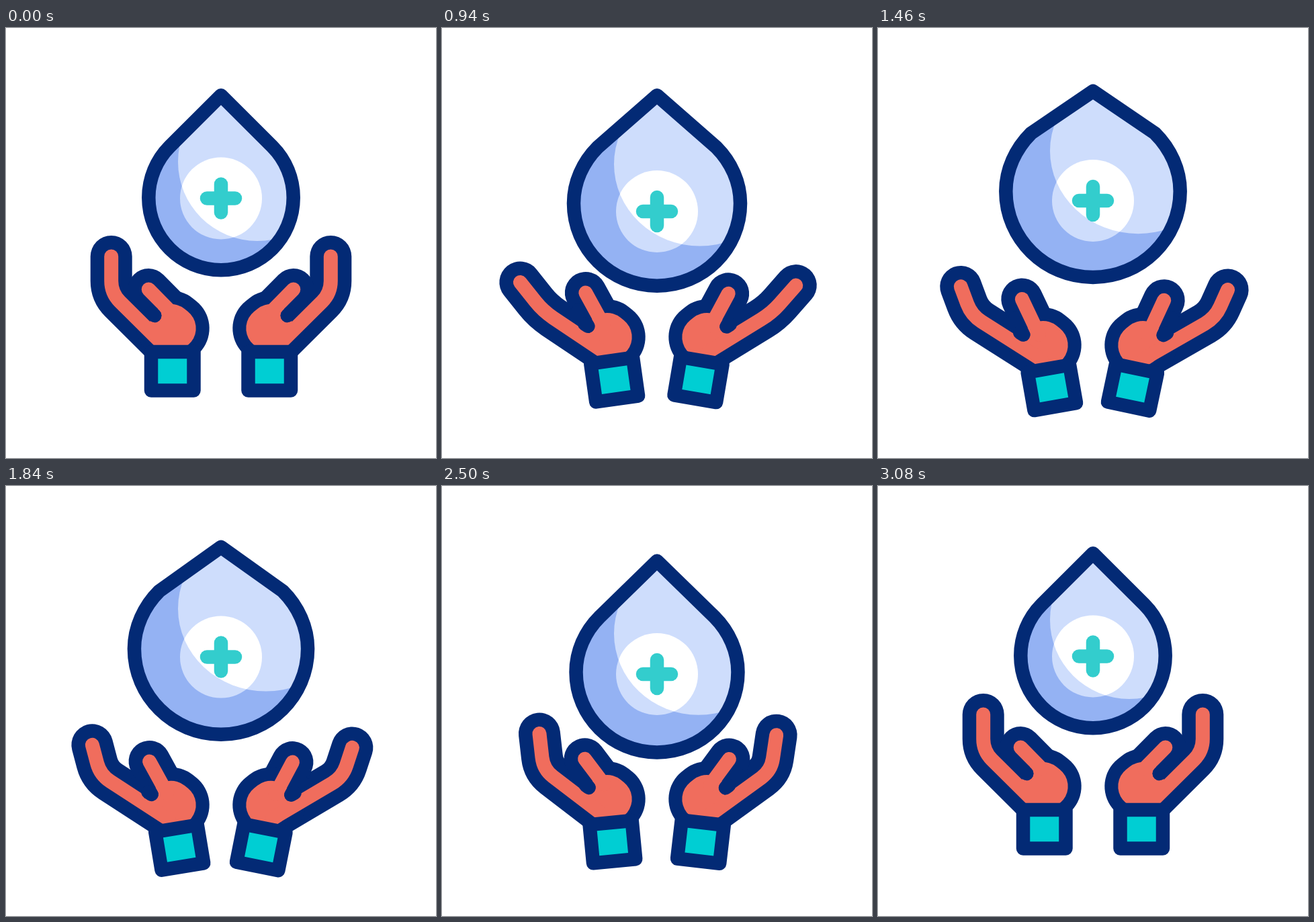
An HTML page with a canvas for the animation above (3.6 s loop, 640x640 px).

```html
<!DOCTYPE html>
<html lang="en">
<head>
<meta charset="utf-8">
<title>Caring hands</title>
<style>
  html, body { margin: 0; width: 100%; height: 100%; overflow: hidden; background: #fff; }
  canvas { display: block; width: 640px; height: 640px; }
</style>
</head>
<body>
<canvas id="stage" width="640" height="640"></canvas>
<script>
const ctx = document.getElementById('stage').getContext('2d');
const LOOP = 3600, REST = 3080, LINE = 20.5, TAU = Math.PI * 2, RAD = Math.PI / 180;
const NAVY = '#032a75', CORAL = '#f06d5d', TEAL = '#00ced3', PLUS = '#33cdcd';
const BODY = '#94b2f3', LIGHT = '#ceddfc';

// A value over time that leaves 0, passes smoothly through a few points and returns to 0
function track(points) {
  const keys = [[0, 0], ...Object.entries(points).map(([t, v]) => [+t, v]), [REST, 0]];
  const last = keys.length - 1;
  const rate = n => (keys[n + 1][1] - keys[n][1]) / (keys[n + 1][0] - keys[n][0]);
  const slope = n => {
    if (n === 0 || n === last) return 0;
    const a = rate(n - 1), b = rate(n);
    return a * b > 0 ? 2 * a * b / (a + b) : 0;
  };
  return t => {
    if (t >= REST) return 0;
    let i = 0;
    while (t >= keys[i + 1][0]) i++;
    const [t0, a] = keys[i], [t1, b] = keys[i + 1];
    const span = t1 - t0, u = (t - t0) / span, w = 1 - u;
    return a + (b - a) * u * u * (3 - 2 * u)
      + span * u * w * (slope(i) * w - slope(i + 1) * u);
  };
}

const hand = {
  tilt: track({ 420: 2.2, 940: 8, 1320: 10, 2180: 8.5, 2500: 5.5 }),
  sink: track({ 420: 0.3, 940: 13, 1180: 26, 1460: 25, 2180: 30, 2500: 19 }),
  spread: track({ 420: 13.4, 940: 38.5, 1140: 36, 1460: 20.5, 2180: 11, 2500: 6.5 }),
  reach: track({ 940: 0, 1460: 9, 2180: 7, 2500: 1 }),
  lift: track({ 420: 2.7, 940: 8, 1320: 11, 2180: 3.5 })
};
const drop = {
  top: track({ 940: 0, 1460: -6.3, 1640: -10, 1980: -8.5, 2180: 9.2, 2260: 12.5, 2500: 11.2 }),
  middle: track({ 420: 1.5, 940: 8.5, 1460: -9.5, 1640: -11.5, 1980: -8, 2180: 15.5, 2500: 24.5 }),
  widen: track({ 420: 2.3, 940: 16.3, 1460: 22, 2180: 20, 2500: 12.8 }),
  badge: track({ 420: 3.5, 940: 19.5, 1460: 3.5, 1640: 0, 1980: 3, 2180: 22.5, 2500: 26.5 })
};

function stroke(path, color, width) {
  ctx.strokeStyle = color;
  ctx.lineWidth = width;
  ctx.stroke(path);
}

function fill(path, color) {
  ctx.fillStyle = color;
  ctx.fill(path);
}

function line(...points) {
  const p = new Path2D();
  points.forEach(([x, y]) => p.lineTo(x, y));
  return p;
}

function ellipse(x, y, rx, ry = rx) {
  const p = new Path2D();
  p.ellipse(x, y, rx, ry, 0, 0, TAU);
  return p;
}

// Point at a distance from p in a direction
const step = ([x, y], angle, d) => [x + Math.cos(angle) * d, y + Math.sin(angle) * d];
const angleTo = (p, q) => Math.atan2(q[1] - p[1], q[0] - p[0]);
const gap = (p, q) => Math.hypot(q[0] - p[0], q[1] - p[1]);

function dropPath(apex, sx, sy, w, cy, h) {
  const k = 0.375 * (cy - sy), d = k * Math.SQRT1_2, q = 0.5523, bottom = cy + h;
  const p = new Path2D();
  p.moveTo(320, apex);
  p.lineTo(320 - sx, sy);
  p.bezierCurveTo(320 - sx - d, sy + d, 320 - w, cy - k, 320 - w, cy);
  p.bezierCurveTo(320 - w, cy + q * h, 320 - q * w, bottom, 320, bottom);
  p.bezierCurveTo(320 + q * w, bottom, 320 + w, cy + q * h, 320 + w, cy);
  p.bezierCurveTo(320 + w, cy - k, 320 + sx + d, sy + d, 320 + sx, sy);
  p.closePath();
  return p;
}

function drawDrop(t) {
  const wide = drop.widen(t), cy = 252.5 + drop.middle(t), py = 253.5 + drop.badge(t);
  const body = dropPath(100.3 + drop.top(t), 76.2 + 0.74 * wide, cy - 76.2 - 0.45 * wide,
    107.7 + wide, cy, 107.7 + 0.92 * wide);
  const disc = ellipse(320, py, 61);
  const rx = 118 + 0.6 * wide, ry = 118 + 0.24 * wide;
  const glow = ellipse(256 + rx, cy - 53.5 - 0.3 * wide, rx, ry);

  ctx.save();
  ctx.clip(body);
  fill(body, BODY);
  fill(glow, LIGHT);
  fill(disc, LIGHT);
  ctx.clip(glow);
  fill(disc, '#fff');
  ctx.restore();

  stroke(line([299, py], [341, py]), PLUS, LINE);
  stroke(line([320, py - 21], [320, py + 21]), PLUS, LINE);
  stroke(body, NAVY, LINE);
}

// Left hand, placed around the centre of the palm; lean exaggerates the tilt
function drawHand(t, lean) {
  const tilt = hand.tilt(t) * lean, reach = hand.reach(t), turn = -tilt * RAD;
  const spread = (hand.spread(t) + 1.5 * (lean - 1) * tilt) * RAD;
  const c = Math.cos(turn), s = Math.sin(turn);

  const knuckle = [-94 * c + 52.5 * s - 1.1 * reach, -94 * s - 52.5 * c - reach];
  const tip = step(knuckle, -Math.PI / 2 - spread, 54.5 - reach);
  const root = [-18 + 0.35 * tilt, 23 - 0.6 * tilt];
  const along = angleTo(knuckle, root);
  const finger = line(tip, step(knuckle, angleTo(knuckle, tip), 18));
  finger.quadraticCurveTo(...knuckle, ...step(knuckle, along, 18));
  finger.lineTo(...step(root, along, 8));

  // The thumb passes beside the crease, touching its edge
  const crease = [-29.5 - 0.5 * tilt, -19 + 0.35 * tilt];
  const thumbTip = [-38.5 + 0.2 * hand.lift(t), -58 - hand.lift(t) / lean];
  const dist = gap(thumbTip, crease);
  const aim = angleTo(thumbTip, crease) - Math.asin(21 / dist);
  const thumb = line(thumbTip, step(thumbTip, aim, Math.sqrt(dist * dist - 441) + 10));
  const wedge = line(step(crease, along, -28), crease, step(crease, aim, -28));
  const palm = line([-5, -4], [0, 0]);

  ctx.save();
  ctx.translate(250.7, 447 + hand.sink(t));
  for (const part of [finger, thumb]) stroke(part, NAVY, 62);
  stroke(palm, NAVY, 104);
  stroke(palm, CORAL, 64);
  fill(wedge, NAVY);
  stroke(wedge, NAVY, LINE);
  for (const part of [finger, thumb]) stroke(part, CORAL, 21);
  stroke(line(step(crease, along, -6), crease), NAVY, LINE);

  ctx.rotate(turn);
  const cuff = new Path2D();
  cuff.rect(-34.7, 35, 63.5, 57.5);
  fill(cuff, TEAL);
  stroke(cuff, NAVY, LINE);
  ctx.restore();
}

function frame(t) {
  ctx.fillStyle = '#fff';
  ctx.fillRect(0, 0, 640, 640);
  ctx.lineCap = ctx.lineJoin = 'round';
  drawHand(t, 1);
  ctx.save();
  ctx.translate(640, 0);
  ctx.scale(-1, 1);
  drawHand(t, 1.2);
  ctx.restore();
  drawDrop(t);
}

const begin = performance.now();
function tick() {
  frame((performance.now() - begin) % LOOP);
  requestAnimationFrame(tick);
}
tick();
</script>
</body>
</html>
```
